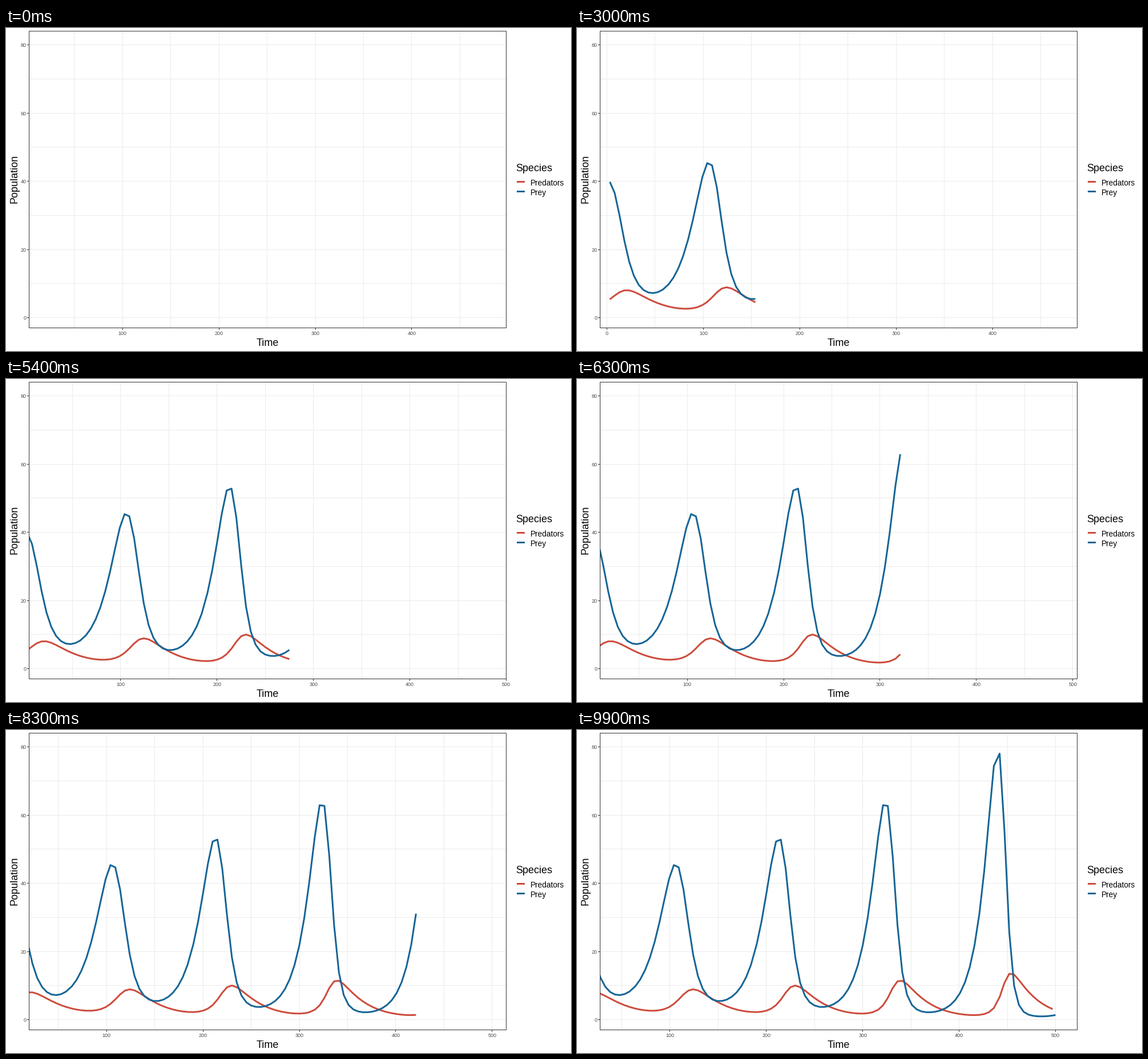
These frames come from a looping animation (990 px wide and 566 px high, 10 s). A matplotlib script:

```python
import numpy as np
import matplotlib.pyplot as plt
from matplotlib.animation import FuncAnimation
from matplotlib.patches import Rectangle

W, H, DPI = 990, 566, 100
FRAMES, STEPS = 100, 500
LEFT, RIGHT, TOP, BOTTOM = 40.5, 876.5, 5.5, 525.5
SPAN = 495
X_SCALE = (RIGHT - LEFT) / SPAN
RED, BLUE = "#cd4b3b", "#166596"
GRID, DARK, LABEL = "#ebebeb", "#333333", "#4d4d4d"

plt.rcParams["font.family"] = "Liberation Sans"


def pt(px):
    return px * 72 / DPI


def simulate():
    """Lotka-Volterra model with unit Euler steps, starting at t = 1."""
    prey, pred = np.empty(STEPS + 1), np.empty(STEPS + 1)
    prey[:2], pred[:2] = 40, 5
    for t in range(1, STEPS):
        x, y = prey[t], pred[t]
        prey[t + 1] = x + 0.1 * x - 0.02 * x * y
        pred[t + 1] = y + 0.002 * x * y - 0.04 * y
    return prey, pred


prey, pred = simulate()
bins = np.arange(FRAMES) + 0.5
times = np.minimum(STEPS, np.floor(1 + bins * (STEPS - 1) / (FRAMES - 1))).astype(int)

# Value range with a 5 % margin at both ends
low, high = min(prey.min(), pred.min()), max(prey.max(), pred.max())
margin = 0.05 * (high - low)
Y_SCALE = (BOTTOM - TOP) / (high - low + 2 * margin)

fig = plt.figure(figsize=(W / DPI, H / DPI), dpi=DPI, facecolor="white")
ax = fig.add_axes([0, 0, 1, 1])
ax.set_xlim(0, W)
ax.set_ylim(H, 0)
ax.axis("off")


def line(xs, ys, color, px=1.0, z=1):
    return ax.plot(xs, ys, color=color, lw=pt(px), zorder=z, snap=False,
                   solid_capstyle="butt", solid_joinstyle="round")[0]


def text(x, y, s, px, color="black", **kw):
    kw = {"va": "baseline", **kw}
    return ax.text(x, y, s, fontsize=pt(px), color=color, **kw)


def pixel(v):
    return np.floor(v) + 0.5


def y_px(v):
    return BOTTOM - Y_SCALE * (v - low + margin)


# Horizontal grid and value axis
for v in range(0, 81, 10):
    y = pixel(y_px(v))
    line([LEFT, RIGHT], [y, y], GRID)
    if v % 20 == 0:
        line([37, LEFT], [y, y], DARK, z=5)
        text(35.5, y + 3.5, str(v), 9, LABEL, ha="right")

panel = Rectangle((LEFT, TOP), RIGHT - LEFT, BOTTOM - TOP, fill=False,
                  ec=DARK, lw=pt(1), zorder=6, snap=False)
ax.add_patch(panel)

# Titles and legend
text(458, 557, "Time", 18, ha="center")
text(19.5, 264, "Population", 18, ha="center", rotation=90,
     rotation_mode="anchor")
text(893, 251, "Species", 18)
for name, color, y in (("Predators", RED, 269.5), ("Prey", BLUE, 286.5)):
    line([895, 909], [y, y], color, 3)
    text(919, y + 6.5, name, 13.6)

# Moving parts
marks = np.arange(0, 501, 50)
grid = {m: line([], [], GRID) for m in marks}
ticks = {m: line([], [], DARK, z=5) for m in marks[::2]}
names = {m: text(0, 538, str(m), 9, LABEL, ha="center") for m in marks[::2]}
red = line([], [], RED, 3, z=3)
blue = line([], [], BLUE, 3, z=4)
for curve in (red, blue):
    curve.set_clip_path(panel)


def update(k):
    start = 0.1 * times[k] - 22.5 if k else 3

    def x_px(t):
        return LEFT + (t - start) * X_SCALE

    for m in marks:
        shown = start - 1e-6 <= m <= start + SPAN + 1e-6
        x = pixel(x_px(m))
        grid[m].set_data([x, x], [TOP, BOTTOM])
        grid[m].set_visible(shown)
        if m in ticks:
            ticks[m].set_data([x, x], [BOTTOM, 529])
            ticks[m].set_visible(shown)
            names[m].set_x(x_px(m))
            names[m].set_visible(shown)

    # The predator series stops one sample short of the end
    for curve, data, last in ((red, pred, FRAMES - 2), (blue, prey, FRAMES - 1)):
        t = times[:min(k, last) + 1] if k else times[:0]
        curve.set_data(x_px(t), y_px(data[t]))
    return []


anim = FuncAnimation(fig, update, frames=FRAMES, init_func=lambda: update(0),
                     interval=100, repeat=True, repeat_delay=0)
plt.show()
```
